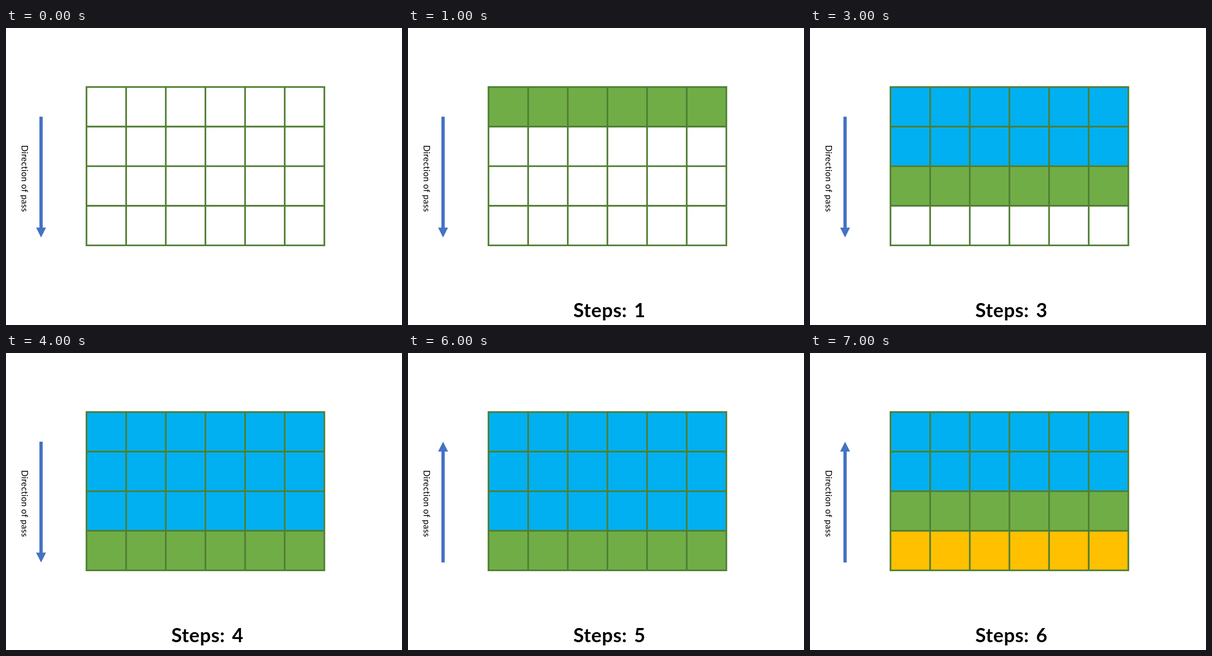
Write an HTML page that moves like this. It is 864 px wide and 648 px high and loops after 8 s.

```html
<!DOCTYPE html>
<html lang="en">
<head>
<meta charset="utf-8">
<title>Direction of pass</title>
<style>
html, body { margin: 0; width: 100%; height: 100%; overflow: hidden; background: #fff; }
svg { display: block; width: 864px; height: 648px; }
text { font-family: Lato, "Open Sans", sans-serif; fill: #000; }
.label { font-size: 18.9px; letter-spacing: .4px; }
.steps { font-size: 42px; font-weight: 700; }
</style>
</head>
<body>
<svg viewBox="0 0 864 648">
  <g id="rows"></g>
  <path id="grid" fill="none" stroke="#507e32" stroke-width="3.6" stroke-linecap="square"/>
  <path id="arrow" fill="#4472c4" d="M72.9 193.5H80.1V435.5H87.3L76.5 457L65.7 435.5H72.9Z"/>
  <text class="label" transform="translate(34 255.4) rotate(90)"><tspan x="0">Direction</tspan> <tspan x="85.4">of</tspan> <tspan x="108.3">pass</tspan></text>
  <g id="counter" class="steps">
    <text x="360.8" y="630.5" letter-spacing=".7">Steps:</text>
    <text id="count" x="493.2" y="630.5"></text>
  </g>
</svg>
<script>
const COLS = 6, ROWS = 4, LEFT = 175.6, TOP = 128.7, CELL_W = 86.5, CELL_H = 86.4;
const TICK = 1000, TICKS = 8;
const EMPTY = "#fff", ACTIVE = "#70ad47", DOWN = "#00b0f0", UP = "#ffc000";
const $ = id => document.getElementById(id);

const right = LEFT + COLS * CELL_W, bottom = TOP + ROWS * CELL_H;
let lines = "";
for (let c = 0; c <= COLS; c++) lines += `M${LEFT + c * CELL_W} ${TOP}V${bottom}`;
for (let r = 0; r <= ROWS; r++) lines += `M${LEFT} ${TOP + r * CELL_H}H${right}`;
$("grid").setAttribute("d", lines);

const bands = Array.from({ length: ROWS }, (_, r) => {
  const band = document.createElementNS("http://www.w3.org/2000/svg", "rect");
  const box = { x: LEFT, y: TOP + r * CELL_H, width: COLS * CELL_W, height: CELL_H };
  for (const key in box) band.setAttribute(key, box[key]);
  return $("rows").appendChild(band);
});

// Rows fill downward first, then pause one tick and refill upward.
function rowColor(row, tick) {
  if (tick <= ROWS + 1) {
    const front = tick - 1;
    return row < front ? DOWN : row === front ? ACTIVE : EMPTY;
  }
  const front = 2 * ROWS + 1 - tick;
  return row > front ? UP : row === front ? ACTIVE : DOWN;
}

function draw(time) {
  const tick = Math.floor(time / TICK) % TICKS;
  const upward = tick > ROWS + 1;
  bands.forEach((band, row) => band.setAttribute("fill", rowColor(row, tick)));
  $("arrow").setAttribute("transform", upward ? "rotate(180 76.5 325.25)" : "");
  $("counter").setAttribute("visibility", tick ? "visible" : "hidden");
  $("count").textContent = tick > ROWS ? tick - 1 : tick;
}

const start = performance.now();
function frame() {
  draw(performance.now() - start);
  requestAnimationFrame(frame);
}
frame();
</script>
</body>
</html>
```
